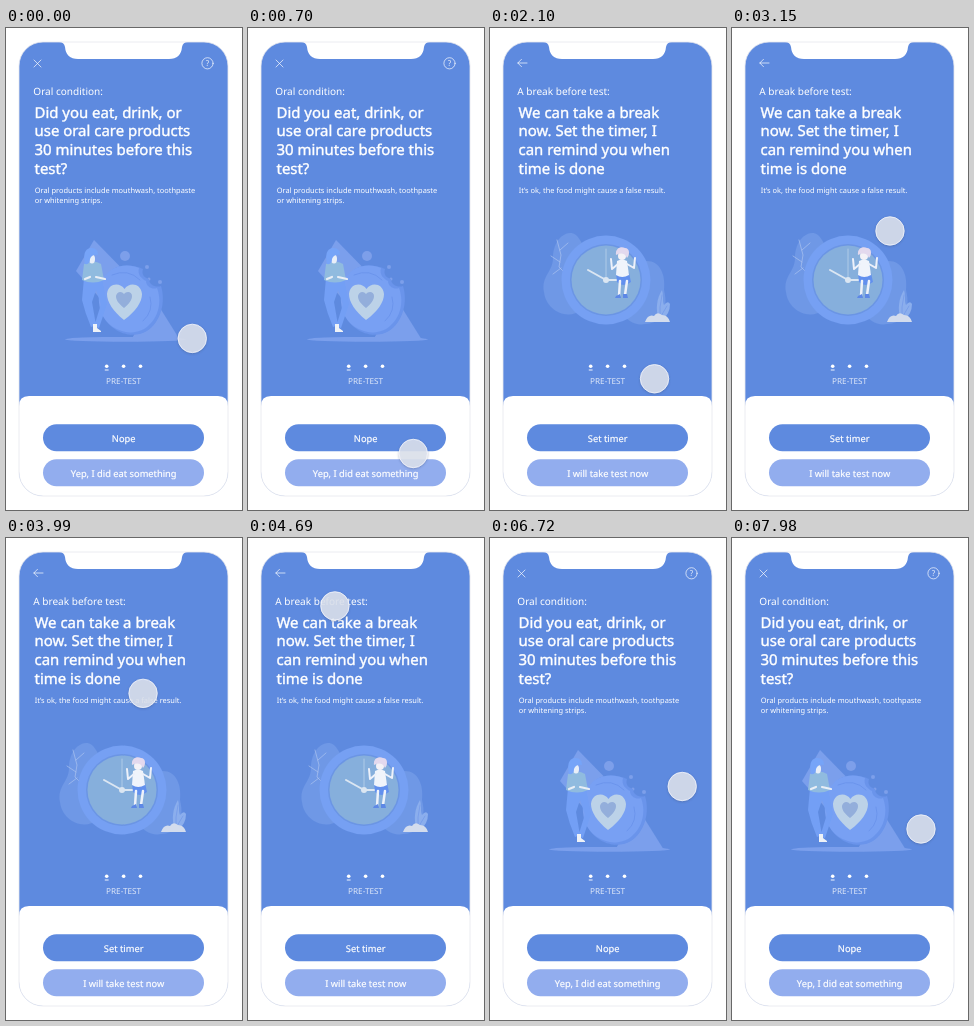
Write an HTML page that moves like this. It is 236 px wide and 482 px high and loops after 8 s.

```html
<!DOCTYPE html>
<html lang="en">
<head>
<meta charset="utf-8">
<title>Pre-test prototype</title>
<style>
html, body { margin: 0; width: 100%; height: 100%; overflow: hidden; background: #fff; }
svg { display: block; width: 236px; height: 482px; }
text { font-family: "Noto Sans", "Open Sans", sans-serif; fill: #fff; text-rendering: geometricPrecision; }
.label { font-size: 10.05px; }
.title { font-size: 14.95px; stroke: #fff; stroke-width: .4px; }
.note { font-size: 7.45px; }
.button { font-size: 9.3px; text-anchor: middle; stroke: #fff; stroke-width: .2px; }
.step { font-size: 8.2px; text-anchor: middle; opacity: .8; }
.help { font-size: 8px; text-anchor: middle; opacity: .85; }
.line { fill: none; stroke: #fff; stroke-width: .9; stroke-linecap: round; stroke-linejoin: round; }
.icon { stroke-width: .8; opacity: .85; }
</style>
</head>
<body>
<svg viewBox="0 0 236 482">
  <defs>
    <clipPath id="phone"><rect x="13" y="14" width="209" height="454" rx="24"/></clipPath>
    <filter id="shadow" x="-30%" y="-30%" width="160%" height="160%">
      <feDropShadow id="drop" dx="0" dy=".8" stdDeviation=".8" flood-color="#3c4f78" flood-opacity=".45"/>
    </filter>

    <g id="donut">
      <ellipse cx="119.5" cy="311.3" rx="60.5" ry="2.4" fill="#7b9fec"/>
      <path d="M88 212L70 243L120 300L130 255Z" fill="#7b9fec"/>
      <path d="M149 272L125 312H174Z" fill="#7b9fec"/>
      <g fill="#7d9fea">
        <circle cx="119" cy="228" r="5"/><circle cx="141" cy="239" r="2"/>
        <circle cx="154" cy="254" r="2"/><circle cx="143" cy="251" r="1.5"/>
      </g>
      <path d="M107 241C116 236 128 237 137 241C135 247 139 250 143 251C143 257 150 260 155 258C160 274 155 294 141 303C124 313 102 302 96 285C91 268 95 249 107 241Z" fill="#6a94eb"/>
      <path d="M105 242C115 236 126 237 133 240C131 247 136 251 140 253C140 259 147 262 151 260C157 276 151 293 138 301C121 310 101 300 95 284C90 267 94 250 105 242Z" fill="#78a0f3"/>
      <path class="line" d="M106 247Q122 240 134 252M144 269Q148 283 137 293" style="stroke:#6a94eb"/>
      <path d="M118 292C107 283 101 274 101 266C102 255 114 254 118.5 261C123 254 135 255 136 266C136 274 130 283 118 292Z" fill="#bcd2e8"/>
      <path d="M118 280C112 275 110 272 110 268C111 263 116 263 118 266C120 263 126 263 126 268C126 272 123 276 118 280Z" fill="#93aedb"/>
      <path d="M78 250L76 272Q79 285 85 299L90 297L86 274L90 262L95 276L88 299L93 300L101 276L96 250Z" fill="#739ff5"/>
      <path d="M78 236Q88 231 95 236L98 252Q87 257 76 252Z" fill="#90bbdf"/>
      <path class="line" d="M79 251L84 249M90 249L99 251" style="stroke:#e8eef6;stroke-width:2.2"/>
      <ellipse cx="86" cy="231" rx="3" ry="4.5" fill="#e9eff8"/>
      <path d="M79 236Q76 222 84 220Q92 219 92 227Q86 226 84 231Q84 237 79 236Z" fill="#76a4f8"/>
      <path d="M87 296L91 296L91 300L95 303V304H87Z" fill="#eef2f7"/>
    </g>

    <g id="clock">
      <path d="M80 205C89 205 91 216 96 221L92 282C76 293 56 282 54 264C51 248 63 244 63 230C63 218 69 206 80 205Z" fill="#6f98e6"/>
      <path d="M150 234C168 229 176 244 174 262C179 282 171 296 155 296C145 298 137 292 131 285Z" fill="#6f98e6"/>
      <path class="line" d="M67 212L71 227L69 239L78 248M70 222L78 215M70 234L61 228M71 240L63 246" style="stroke:#adc3f0;stroke-width:.7"/>
      <circle cx="116" cy="252" r="44.5" fill="#76a0f3"/>
      <circle cx="116" cy="252" r="36" fill="#6b95e4"/>
      <circle cx="116" cy="252" r="34.5" fill="#86afdc"/>
      <path class="line" d="M116 221V249" style="stroke:#a9c6e6;stroke-width:1.2"/>
      <path class="line" d="M98 242L116 252H128" style="stroke:#dbe6f2;stroke-width:2"/>
      <circle cx="116" cy="252" r="3" fill="#dbe6f2"/>
      <path d="M126 245Q132 239 139 245L141 254Q133 260 127 254Z" fill="#6290ee"/>
      <path class="line" d="M130 253L129 268M137 253L135 267" style="stroke:#eef2fa;stroke-width:2.5"/>
      <path d="M127 233Q132 230 137 233L139 247Q132 251 126 247Z" fill="#f0f4fb"/>
      <path class="line" d="M128 236L122 241L121 231M137 236L144 240L145 230" style="stroke:#edf1fa;stroke-width:2"/>
      <circle cx="132" cy="228" r="4" fill="#f4f2f7"/>
      <path d="M126 227C125 220 131 218 135 220C140 220 140 227 137 230Q134 223 126 227Z" fill="#e3d9ee"/>
      <path d="M126 268L130 266L131 270H125ZM133 266L137 266L138 270H133Z" fill="#5d88e6"/>
      <path d="M169 292C165 281 167 270 172 262C174 269 172 273 174 277Q178 272 180 276Q180 286 172 292Z" fill="#8baeed"/>
      <path class="line" d="M170 291Q169 279 172 267M171 288L177 278" style="stroke:#7199e8;stroke-width:.7"/>
      <path d="M155 294Q158 286 164 288Q167 283 172 287Q178 287 180 294Z" fill="#d3dced"/>
    </g>
  </defs>

  <g clip-path="url(#phone)">
    <rect x="13" y="14" width="209" height="454" fill="#5e8adf"/>
    <path d="M13 470V378Q13 368 23 368H212Q222 368 222 378V470Z" fill="#fff"/>
    <g id="question"></g>
    <g id="break"></g>
    <path d="M53 13V14Q58 14 59 19Q60 31 72 31H163Q175 31 176 19Q177 14 182 14V13Z" fill="#fff"/>
  </g>
  <rect x="13" y="14" width="209" height="454" rx="24" fill="none" stroke="#e6e8ee" stroke-width=".8"/>
  <g id="cursor" filter="url(#shadow)">
    <circle id="disc" r="14.2" fill="#e0e5ef" stroke="#f5f7fb" stroke-width=".8"/>
  </g>
</svg>
<script>
const byId = id => document.getElementById(id);

const lines = (cls, x, y, step, rows) => rows.map((row, i) =>
  `<text class="${cls}" x="${x}" y="${y + i * step}">${row}</text>`).join('');

const button = (y, color, caption) =>
  `<rect x="37" y="${y}" width="161" height="27" rx="13.5" fill="${color}"/>
   <text class="button" x="117.7" y="${y + 17.3}">${caption}</text>`;

const screen = ({ icons, label, title, note, art, primary, secondary }) => `
  ${icons}
  ${lines('label', 27.3, 67, 0, [label])}
  ${lines('title', 28.5, 89.7, 18.7, title)}
  ${lines('note', 28.7, 165, 10.3, note)}
  <use href="#${art}"/>
  ${[100.7, 117.6, 134.5].map(x => `<circle cx="${x}" cy="338.2" r="1.8" fill="#fff"/>`).join('')}
  <path class="line" d="M99.2 342H102.2"/>
  <text class="step" x="117.6" y="355.5">PRE-TEST</text>
  ${button(396.3, '#5e8adf', primary)}
  ${button(431.3, '#92adee', secondary)}`;

byId('question').innerHTML = screen({
  icons: `<path class="line icon" d="M28 32L35 39M35 32L28 39"/>
    <circle class="line icon" cx="201.5" cy="35.3" r="5.6"/><text class="help" x="201.5" y="38.2">?</text>`,
  label: 'Oral condition:',
  title: ['Did you eat, drink, or', 'use oral care products', '30 minutes before this', 'test?'],
  note: ['Oral products include mouthwash, toothpaste', 'or whitening strips.'],
  art: 'donut', primary: 'Nope', secondary: 'Yep, I did eat something'
});
byId('break').innerHTML = screen({
  icons: '<path class="line icon" d="M37 35H27.8M31.5 31.3L27.8 35L31.5 38.7"/>',
  label: 'A break before test:',
  title: ['We can take a break', 'now. Set the timer, I', 'can remind you when', 'time is done'],
  note: ['It’s ok, the food might cause a false result.'],
  art: 'clock', primary: 'Set timer', secondary: 'I will take test now'
});

const LOOP = 8000, WIDTH = 209;
// Cursor stops: time, x, y
const path = [
  [0, 186.3, 310.4], [840, 163, 437], [1350, 161.3, 443.5], [1720, 161.3, 443.5],
  [2500, 168, 235], [3150, 158, 203], [3600, 152, 190], [4690, 87, 68],
  [5040, 35, 39], [5500, 31, 34], [6220, 31, 34], [6720, 192.2, 248.4],
  [7100, 194, 266], [7980, 189, 291], [8000, 189, 291]
];

const slope = (i, k) => (path[i + 1][k] - path[i][k]) / (path[i + 1][0] - path[i][0]);

// Tangents vanish at turning points, so the cursor never overshoots a stop.
function tangent(i, k) {
  if (i === 0 || i === path.length - 1) return 0;
  const a = slope(i - 1, k), b = slope(i, k);
  return a * b > 0 ? 2 * a * b / (a + b) : 0;
}

function position(t, k) {
  const i = Math.max(0, path.findIndex(p => p[0] > t) - 1);
  const span = path[i + 1][0] - path[i][0], u = (t - path[i][0]) / span;
  const ease = u * u * (3 - 2 * u), v = 1 - u;
  return path[i][k] * (1 - ease) + path[i + 1][k] * ease +
    span * u * v * (v * tangent(i, k) - u * tangent(i + 1, k));
}

function smooth(t, from, to) {
  const u = Math.min(1, Math.max(0, (t - from) / (to - from)));
  return u * u * (3 - 2 * u);
}

const shift = (id, x, y = 0) => byId(id).setAttribute('transform', `translate(${x} ${y})`);

function draw(now) {
  const t = now % LOOP;
  const push = smooth(t, 1590, 1950) - smooth(t, 6260, 6620);
  const press = smooth(t, 1400, 1500) - smooth(t, 1600, 1740);
  shift('question', -WIDTH * push);
  shift('break', WIDTH * (1 - push));
  shift('cursor', position(t, 1), position(t, 2));
  byId('disc').setAttribute('fill-opacity', 0.84 - 0.36 * press);
  byId('drop').setAttribute('flood-opacity', 0.45 * (1 - press));
  requestAnimationFrame(draw);
}
requestAnimationFrame(draw);
</script>
</body>
</html>
```
